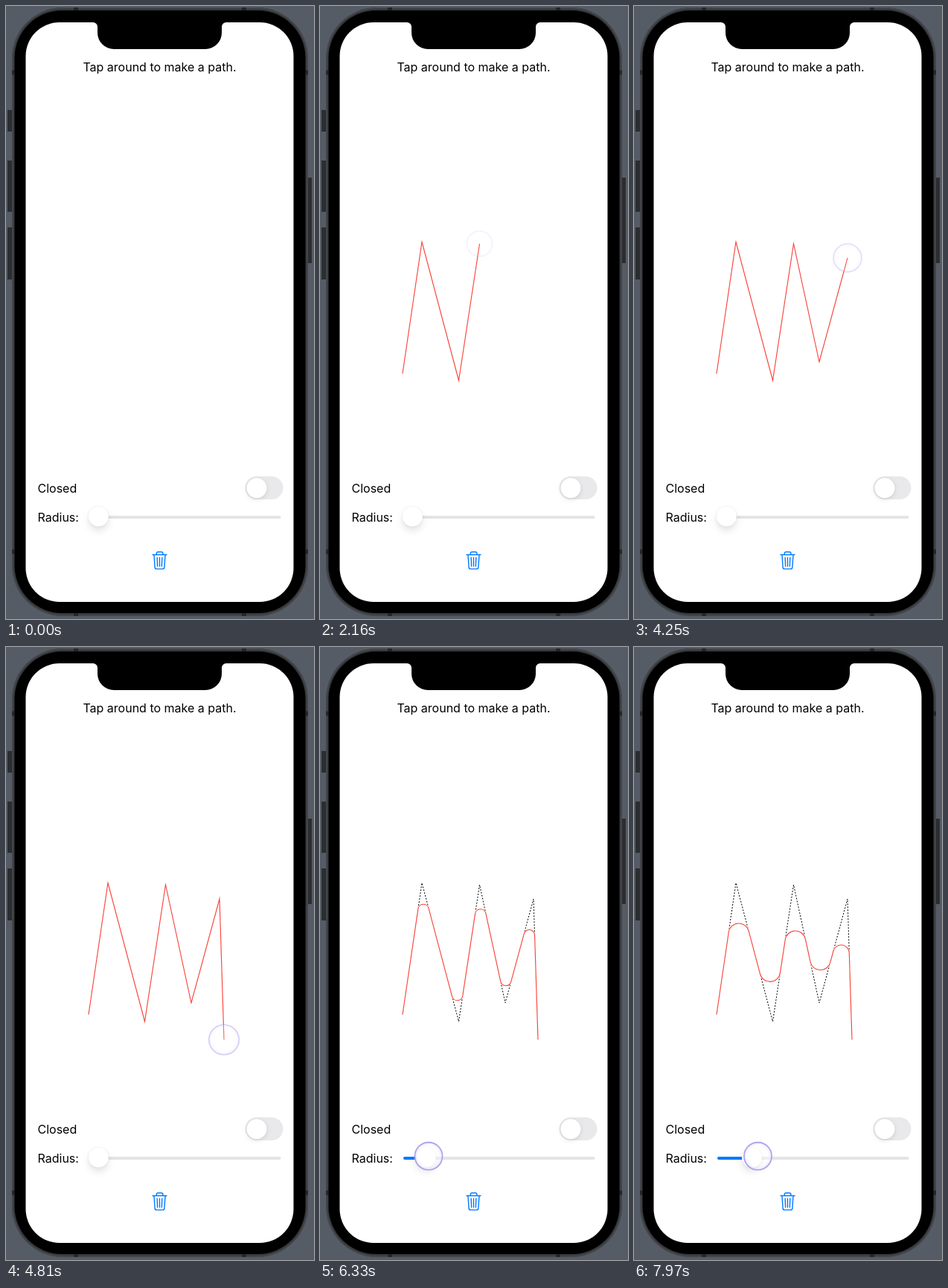
Recreate the animation shown at these times as an HTML page. Size 414 by 825 pixels, loop 8000 ms.

```html
<!DOCTYPE html>
<html lang="en">
<head>
<meta charset="utf-8">
<title>Rounded path</title>
<style>
  html, body { margin: 0; width: 100%; height: 100%; overflow: hidden; background: #555c66; }
  svg { display: block; width: 100%; height: 100%; }
  text { font: 16px Inter, "Liberation Sans", sans-serif; fill: #000; }
  .path { fill: none; stroke-miterlimit: 10; }
  .knob { fill: #fff; filter: drop-shadow(0 6px 5px rgba(0, 0, 0, .1)) drop-shadow(0 0 1px rgba(0, 0, 0, .1)); }
  .switch { fill: #fff; filter: drop-shadow(0 2px 3px rgba(0, 0, 0, .1)) drop-shadow(0 0 1px rgba(0, 0, 0, .06)); }
  .icon { fill: none; stroke: #007aff; stroke-width: 1.4; stroke-linecap: round; stroke-linejoin: round; }
  .touch { fill: url(#glow); stroke: #aa9fec; stroke-width: 1.6; }
</style>
</head>
<body>
<svg viewBox="0 0 414 825">
  <defs>
    <radialGradient id="glow">
      <stop offset="0" stop-color="#fff" stop-opacity=".4"/>
      <stop offset=".7" stop-color="#fff" stop-opacity=".45"/>
      <stop offset=".88" stop-color="#f1effd" stop-opacity=".65"/>
      <stop offset="1" stop-color="#d2ccf8" stop-opacity=".85"/>
    </radialGradient>
  </defs>

  <!-- phone -->
  <g fill="#2b2d30">
    <rect x="2" y="140" width="6" height="29"/>
    <rect x="2" y="208" width="6" height="69"/>
    <rect x="2" y="298" width="6" height="70"/>
    <rect x="406" y="231" width="5" height="115"/>
  </g>
  <rect x="8" y="2" width="398" height="819" rx="68" fill="#36383b"/>
  <rect x="9" y="3" width="396" height="817" rx="67" fill="none" stroke="#505356"/>
  <path d="M8 89.500h4M402 89.500h4M8 734.500h4M402 734.500h4M94 2v4M320 2v4M94 817v4M320 817v4" stroke="#242628" stroke-width="6"/>
  <rect x="11.5" y="6" width="391" height="811" rx="64" fill="#000"/>
  <rect x="26.5" y="22" width="360" height="780" rx="45.5" fill="#fff"/>
  <path d="M117 21.500v.5a6 6 0 0 1 6 6v8a22 22 0 0 0 22 22h123a22 22 0 0 0 22-22v-8a6 6 0 0 1 6-6v-.5z"/>

  <!-- controls -->
  <text x="206.5" y="88" text-anchor="middle">Tap around to make a path.</text>
  <text x="42.5" y="655">Closed</text>
  <text x="42.5" y="693.5">Radius:</text>
  <rect x="321.5" y="633" width="51" height="31" rx="15.5" fill="#e9e9eb"/>
  <circle class="switch" cx="337" cy="648.7" r="13.5"/>
  <rect x="112" y="686" width="257.5" height="4" rx="2" fill="#e4e4e6"/>
  <rect id="fill" x="112" y="686" height="4" rx="2" fill="#007aff"/>
  <circle id="knob" class="knob" cy="687" r="13.5"/>
  <path class="icon" d="M197 738.5h19M202.3 738.3v-1.6q0-2 2-2h4.6q2 0 2 2v1.6M199 738.8l1.1 16.6q.2 2.2 2.4 2.2h8q2.2 0 2.4-2.2l1.1-16.6M203.2 742.3l.4 11.7M206.5 742.3v11.7M209.8 742.3l-.4 11.7"/>

  <!-- drawing: the white line keeps the dashes from showing through the red one -->
  <path id="sharp" class="path" stroke="#000" stroke-dasharray="2 2"/>
  <path id="mask" class="path" stroke="#fff" stroke-width="2"/>
  <path id="round" class="path" stroke="#fb4038" stroke-width="1.1"/>
  <g id="touches"></g>
</svg>
<script>
const LOOP = 8000, STEP = 80;
const $ = id => document.getElementById(id);

// Path points with the time each one is tapped and released.
const taps = [
  { x: 111, y: 494.5, down: -1 },
  { x: 137, y: 317.5, down: 160, up: 400 },
  { x: 186.5, y: 504, down: 800, up: 1200 },
  { x: 214.5, y: 320, down: 1520, up: 1840 },
  { x: 249, y: 479, down: 2400, up: 2720 },
  { x: 287, y: 339, down: 3770, up: 4090 },
  { x: 293, y: 528.5, down: 4410, up: 4730 }
];
const DRAG = 5690;

// Spans of movement [first step, last step]; the picture rests in between.
const spans = [[0, 3200], [3770, 6730], [7890, 7970]];

// Tables of [time, value, value, ...]
const press = [[0, 22.5, .9], [80, 23.6, 1], [160, 24, 1]];
const release = [[-80, 24, 1], [0, 21.6, .65], [160, 19, .32], [320, 17.2, .13], [480, 16, .05]];
const dragPress = [[0, 22.5, .95], [80, 24, 1], [240, 23, 1], [480, 19.2, 1], [640, 18.6, 1]];
// [time, corner radius, touch x]
const drag = [[5850, 0, 128], [6010, 1.6, 132], [6330, 7.25, 146], [6490, 9, 150.5],
              [6730, 11, 155.5], [7810, 11, 155.5], [7890, 12, 160], [7970, 13.75, 166.5]];

function sample(table, t) {
  const next = table.findIndex(row => row[0] > t);
  if (next === 0) return table[0].slice(1);
  if (next < 0) return table[table.length - 1].slice(1);
  const a = table[next - 1], b = table[next], k = (t - a[0]) / (b[0] - a[0]);
  return a.slice(1).map((v, i) => v + (b[i + 1] - v) * k);
}

function snap(t) {
  const [first, last] = spans.filter(span => t >= span[0]).pop();
  return Math.min(last, first + Math.floor((t - first) / STEP) * STEP);
}

const polyline = pts => "M" + pts.map(p => `${p.x} ${p.y}`).join("L");

function roundedPath(pts, radius) {
  if (radius <= 0) return polyline(pts);
  let d = `M${pts[0].x} ${pts[0].y}`;
  for (let i = 1; i < pts.length - 1; i++) {
    const p = pts[i];
    const [a, b] = [pts[i - 1], pts[i + 1]].map(q => {
      const dx = q.x - p.x, dy = q.y - p.y, len = Math.hypot(dx, dy);
      return { x: dx / len, y: dy / len, len };
    });
    const tan = Math.tan(Math.acos(a.x * b.x + a.y * b.y) / 2);
    const cut = Math.min(radius / tan, a.len / 2, b.len / 2);
    const r = cut * tan;
    const sweep = a.x * b.y - a.y * b.x < 0 ? 1 : 0;
    d += `L${p.x + a.x * cut} ${p.y + a.y * cut}`
       + `A${r} ${r} 0 0 ${sweep} ${p.x + b.x * cut} ${p.y + b.y * cut}`;
  }
  const end = pts[pts.length - 1];
  return d + `L${end.x} ${end.y}`;
}

function makeTouch() {
  const c = document.createElementNS("http://www.w3.org/2000/svg", "circle");
  c.setAttribute("class", "touch");
  return $("touches").appendChild(c);
}

function showTouch(el, cx, cy, [r, opacity]) {
  const attrs = { cx, cy, r, opacity };
  for (const name in attrs) el.setAttribute(name, attrs[name]);
}

const touches = taps.map(makeTouch);
const finger = makeTouch();

function draw(t) {
  const [radius, fingerX] = sample(drag, t);
  const pts = taps.filter(p => t >= p.down);
  const rounded = roundedPath(pts, radius);
  $("sharp").setAttribute("d", polyline(pts));
  $("mask").setAttribute("d", rounded);
  $("round").setAttribute("d", rounded);

  const knobX = 124.3 + radius * 2.48;
  $("knob").setAttribute("cx", knobX);
  $("fill").setAttribute("width", radius > 0 ? knobX - 112 : 0);

  taps.forEach((p, i) => {
    const visible = p.up && t >= p.down && t < p.up + 560;
    const look = !visible ? [0, 0]
      : t < p.up ? sample(press, t - p.down) : sample(release, t - p.up);
    showTouch(touches[i], p.x, p.y, look);
  });
  showTouch(finger, fingerX, 685.2, t < DRAG ? [0, 0] : sample(dragPress, t - DRAG));
}

const started = performance.now();
function frame() {
  draw(snap((performance.now() - started) % LOOP));
  requestAnimationFrame(frame);
}
frame();
</script>
</body>
</html>
```
